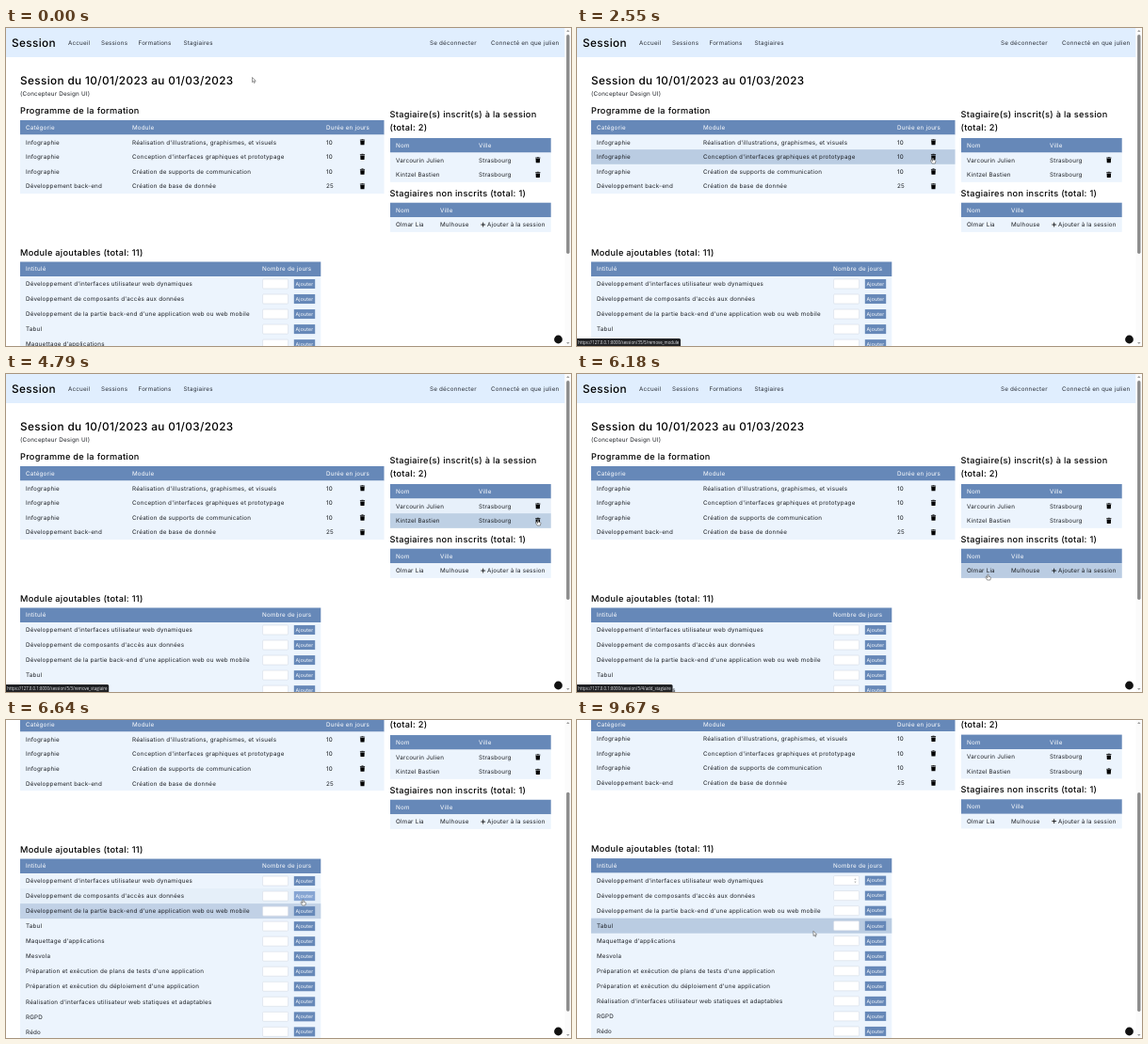
Animation of 600 by 338 pixels, one loop 9.7 s. Source, as an HTML page with a canvas:

```html
<!DOCTYPE html>
<html lang="fr">
<head>
<meta charset="utf-8">
<title>Session</title>
<style>
html, body { margin: 0; width: 100%; height: 100%; overflow: hidden; background: #fff; }
canvas { display: block; width: 600px; height: 338px; }
</style>
</head>
<body>
<canvas id="stage"></canvas>
<script>
const W = 600, H = 338, LOOP = 9700, FADE = 200, MAX_SCROLL = 101.4;
const canvas = document.getElementById('stage');
const dpr = window.devicePixelRatio || 1;
canvas.width = W * dpr;
canvas.height = H * dpr;
const ctx = canvas.getContext('2d');

const BLUE = '#6688b8', ROW = '#ecf4fd', HOVER = '#bacce2', INK = '#1c1f24';

// links: horizontal ranges where the pointer becomes a hand
const tables = [
  { x: 15, w: 386.5, top: 98, head: 15.5, pitch: 15.65, cols: [21, 134, 340], trash: 378.5,
    titles: ['Catégorie', 'Module', 'Durée en jours'], links: [[373, 385]],
    rows: [
      ['Infographie', "Réalisation d'illustrations, graphismes, et visuels", '10'],
      ['Infographie', "Conception d'interfaces graphiques et prototypage", '10'],
      ['Infographie', 'Création de supports de communication', '10'],
      ['Développement back-end', 'Création de base de donnée', '25']] },
  { x: 408, w: 170.7, top: 117, head: 15.5, pitch: 15.65, cols: [414, 502], trash: 564.8,
    titles: ['Nom', 'Ville'], links: [[414, 471], [559, 571]],
    rows: [['Varcourin Julien', 'Strasbourg'], ['Kintzel Bastien', 'Strasbourg']] },
  { x: 408, w: 170.7, top: 185.7, head: 15.5, pitch: 15.65, cols: [414, 461, 511], plus: 506.7,
    titles: ['Nom', 'Ville'], links: [[414, 448], [504, 573]],
    rows: [['Olmar Lia', 'Mulhouse', 'Ajouter à la session']] },
  { x: 15, w: 319.3, top: 248.5, head: 15.5, pitch: 16.03, cols: [21], form: true,
    titles: ['Intitulé'], links: [[306, 328]],
    rows: [
      "Développement d'interfaces utilisateur web dynamiques",
      "Développement de composants d'accès aux données",
      "Développement de la partie back-end d'une application web ou web mobile",
      'Tabul', "Maquettage d'applications", 'Mesvola',
      "Préparation et exécution de plans de tests d'une application",
      "Préparation et exécution du déploiement d'une application",
      "Réalisation d'interfaces utilisateur web statiques et adaptables",
      'RGPD', 'Rédo'].map(title => [title]) }
];

// pointer tip: time, x, y
const path = [
  [0, 261.5, 52.5], [150, 261.5, 52.5], [700, 375, 119], [900, 378, 121], [1350, 300, 123],
  [1610, 233, 129.3], [1650, 234, 131], [1920, 375, 137], [2300, 378, 138], [3230, 378, 138],
  [3450, 436.5, 145.5], [3620, 438, 146], [4050, 563, 140], [4450, 564, 140], [4750, 565, 155],
  [5200, 565, 155], [5600, 540, 209], [5950, 535, 209], [6180, 436.5, 213], [6300, 345, 214],
  [6440, 326, 212], [6580, 318, 204], [6640, 315.5, 191], [6780, 312, 174], [7000, 286, 170.5],
  [8050, 286, 170.5], [8350, 317, 171.5], [8800, 317, 171.5], [9150, 298, 196], [9670, 251, 224.3]
];

const statuses = [
  [700, 1350, '33/5/remove_module'], [1950, 3600, '35/5/remove_module'],
  [4100, 4650, '5/2/remove_stagiaire'], [4750, 5500, '5/3/remove_stagiaire'],
  [5600, 6300, '5/4/add_stagiaire']
];

function pointer(t) {
  const i = path.findIndex(p => p[0] > t);
  if (i < 0) return path[path.length - 1].slice(1);
  if (i === 0) return path[0].slice(1);
  const a = path[i - 1], b = path[i];
  const u = (t - a[0]) / (b[0] - a[0]), e = u * u * (3 - 2 * u);
  return [a[1] + (b[1] - a[1]) * e, a[2] + (b[2] - a[2]) * e];
}

function scrollAt(t) {
  const u = Math.min(1, Math.max(0, (t - 6190) / 540));
  return MAX_SCROLL * (1 - (1 - u) ** 3);
}

function hit(t) {
  const [x, py] = pointer(t), y = py + scrollAt(t);
  for (const table of tables) {
    const row = Math.floor((y - table.top - table.head) / table.pitch);
    if (x >= table.x && x < table.x + table.w && row >= 0 && row < table.rows.length) {
      return { table, row, link: table.links.some(([a, b]) => x >= a && x <= b) };
    }
  }
  return {};
}

function rect(x, y, w, h, color) {
  ctx.fillStyle = color;
  ctx.fillRect(x, y, w, h);
}

function text(str, x, middle, { size = 6.27, weight = 400, color = INK, align = 'left' } = {}) {
  ctx.font = `${weight} ${size}px Inter, sans-serif`;
  ctx.letterSpacing = size * 0.032 + 'px';
  ctx.textRendering = 'geometricPrecision';
  ctx.textAlign = align;
  ctx.fillStyle = color;
  ctx.fillText(str, x, middle + size * 0.35);
}

const heading = (str, x, y, size = 9.2) => text(str, x, y, { size, weight: 500, color: '#000' });

function polygon(points, color) {
  ctx.beginPath();
  points.forEach(([x, y]) => ctx.lineTo(x, y));
  ctx.closePath();
  ctx.fillStyle = color;
  ctx.fill();
}

function triangle(x, y, r, dir, color) {
  polygon([[x - r, y + r * dir / 2], [x + r, y + r * dir / 2], [x, y - r * dir / 2]], color);
}

function trash(x, y) {
  rect(x - 2.6, y - 2.7, 5.2, 0.8, '#000');
  rect(x - 1, y - 3.2, 2, 0.6, '#000');
  polygon([[x - 2.3, y - 1.5], [x + 2.3, y - 1.5], [x + 2, y + 3], [x - 2, y + 3]], '#000');
}

function plus(x, y) {
  rect(x - 2.4, y - 0.4, 4.8, 0.8, '#000');
  rect(x - 0.4, y - 2.4, 0.8, 4.8, '#000');
}

function formRow(y, focused, pressed) {
  ctx.beginPath();
  ctx.roundRect(272.6, y - 5, 27, 10, 1);
  ctx.fillStyle = '#fff';
  ctx.fill();
  ctx.strokeStyle = '#d3dbe5';
  ctx.lineWidth = 0.6;
  ctx.stroke();
  if (focused) {
    triangle(295.5, y - 1.6, 1.1, 1, '#777');
    triangle(295.5, y + 1.6, 1.1, -1, '#777');
  }
  rect(305.8, y - 5, 22.4, 10, pressed ? '#86a5d3' : BLUE);
  text('Ajouter', 317, y, { size: 5.2, color: '#fff', align: 'center' });
}

function drawTable(table, t, over, shades) {
  const { x, w, top, head, pitch, cols, rows, titles } = table;
  rect(x, top, w, head, BLUE);
  titles.forEach((title, i) => text(title, cols[i], top + head / 2, { color: '#fff' }));
  if (table.form) text('Nombre de jours', 272, top + head / 2, { color: '#fff' });
  rect(x, top + head, w, pitch * rows.length, ROW);
  rows.forEach((cells, r) => {
    const y = top + head + r * pitch, mid = y + pitch / 2;
    ctx.globalAlpha = shades.filter(s => s.table === table && s.row === r).length / shades.length;
    rect(x, y, w, pitch, HOVER);
    ctx.globalAlpha = 1;
    cells.forEach((cell, i) => text(cell, cols[i], mid));
    if (table.trash) trash(table.trash, mid);
    if (table.plus) plus(table.plus, mid);
    if (table.form) {
      formRow(mid, r === 0 && t > 6950, over.link && over.table === table && over.row === r);
    }
  });
}

function drawPage(t, over, shades) {
  rect(0, 0, 593.5, 31, '#e0eefe');
  heading('Session', 6, 16, 11.8);
  const nav = { color: '#2b3038' };
  [['Accueil', 66], ['Sessions', 101], ['Formations', 140.5], ['Stagiaires', 188.5],
   ['Se déconnecter', 450]].forEach(([label, x]) => text(label, x, 16, nav));
  text('Connecté en que julien', 587.5, 16, { ...nav, align: 'right' });

  heading('Session du 10/01/2023 au 01/03/2023', 15, 56, 11.75);
  text('(Concepteur Design UI)', 15, 69.7);
  heading('Programme de la formation', 15, 87.5);
  heading('Stagiaire(s) inscrit(s) à la session', 407.5, 92);
  heading('(total: 2)', 407.5, 106);
  heading('Stagiaires non inscrits (total: 1)', 407.5, 175.3);
  heading('Module ajoutables (total: 11)', 15, 238.3);
  tables.forEach(table => drawTable(table, t, over, shades));
}

function drawScrollbar(scroll) {
  rect(593.5, 0, 6.5, H, '#fbfbfb');
  triangle(596.8, 3, 1.7, 1, '#777');
  triangle(596.8, 335, 1.7, -1, '#777');
  ctx.beginPath();
  ctx.roundRect(595.1, 7 + scroll * 0.69, 3.4, 233, 1.7);
  ctx.fillStyle = '#8b8b8b';
  ctx.fill();
}

function drawStatus(t) {
  const status = statuses.find(([from, to]) => t >= from && t < to);
  if (!status) return;
  const url = 'https://127.0.0.1:8000/session/' + status[2];
  ctx.font = '4.4px "Open Sans", sans-serif';
  ctx.letterSpacing = '0px';
  ctx.textAlign = 'left';
  const width = ctx.measureText(url).width + 3;
  ctx.beginPath();
  ctx.roundRect(0, 330, width, 8, [0, 1.5, 0, 0]);
  ctx.fillStyle = '#202124';
  ctx.fill();
  ctx.fillStyle = '#e4e6ea';
  ctx.fillText(url, 1.2, 335.6);
}

function drawPointer(t, hand) {
  const [x, y] = pointer(t);
  const shape = hand
    ? 'M-.6 .4Q0-.5.6.4V2.3L2.6 2.8Q3 3 2.9 3.7L2.4 6H-.9L-2.3 3.6Q-2-.0-.6 3.8Z'
    : 'M0 0V5.2L1.2 4.1L2 6L2.9 5.6L2.1 3.8H3.7Z';
  ctx.save();
  ctx.translate(x, y);
  ctx.lineWidth = 0.55;
  ctx.strokeStyle = '#444';
  ctx.fillStyle = '#fff';
  const outline = new Path2D(shape);
  ctx.fill(outline);
  ctx.stroke(outline);
  ctx.restore();
}

function draw(t) {
  const scroll = scrollAt(t), over = hit(t);
  // share of recent time spent on a row gives its linear hover fade
  const shades = Array.from({ length: 20 }, (_, k) => hit(Math.max(0, t - (k + 0.5) * FADE / 20)));
  ctx.setTransform(dpr, 0, 0, dpr, 0, 0);
  rect(0, 0, W, H, '#fff');
  ctx.save();
  ctx.translate(0, -scroll);
  drawPage(t, over, shades);
  ctx.restore();
  drawScrollbar(scroll);
  ctx.beginPath();
  ctx.arc(586.5, 331, 4.4, 0, Math.PI * 2);
  ctx.fillStyle = '#111';
  ctx.fill();
  drawStatus(t);
  drawPointer(t, over.link);
}

function frame() {
  draw(performance.now() % LOOP);
  requestAnimationFrame(frame);
}
frame();
</script>
</body>
</html>
```
